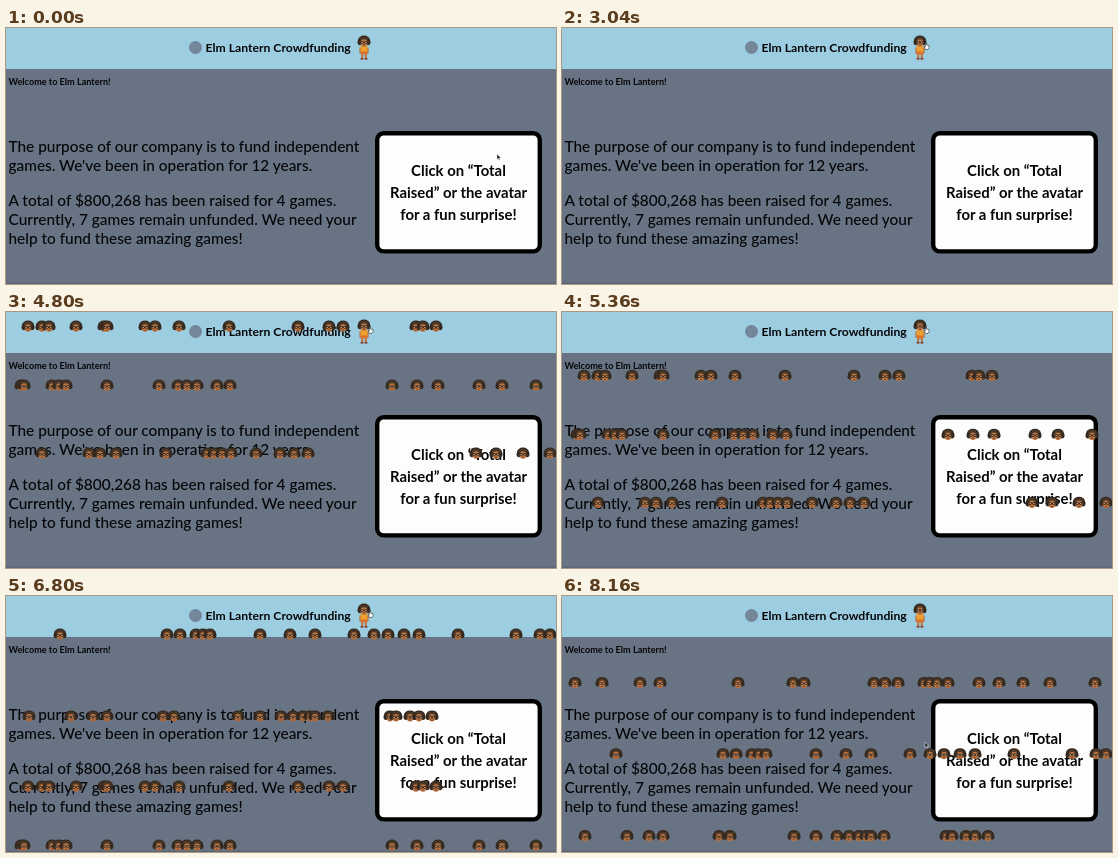
Write an HTML page with a canvas that moves like this. It is 550 px wide and 256 px high and loops after 8240 ms.

```html
<!DOCTYPE html>
<html lang="en">
<head>
<meta charset="utf-8">
<title>Elm Lantern Crowdfunding</title>
<style>
  html, body { margin: 0; width: 100%; height: 100%; overflow: hidden; background: #687484; }
  svg, canvas { position: absolute; left: 0; top: 0; width: 550px; height: 256px; display: block; }
  text { font-family: Lato, "Open Sans", sans-serif; fill: #050608; }
  .head { font-size: 12.2px; font-weight: 700; }
  .welcome { font-size: 9.1px; font-weight: 700; }
  .copy { font-size: 15.4px; font-weight: 500; }
  .note { font-size: 14.9px; font-weight: 700; text-anchor: middle; }
</style>
</head>
<body>
<svg viewBox="0 0 550 256">
  <rect width="550" height="256" fill="#687484"/>
  <rect width="550" height="41" fill="#9dcde1"/>
  <rect y="254.5" width="550" height="1.5" fill="#5c6776"/>
  <circle cx="189.5" cy="19.5" r="6.5" fill="#74869a"/>
  <text class="head" x="199.5" y="24">Elm Lantern Crowdfunding</text>
  <text class="welcome" x="2.5" y="57.3">Welcome to Elm Lantern!</text>
  <g class="copy">
    <text x="2.5" y="124.3">The purpose of our company is to fund independent</text>
    <text x="2.5" y="143.2">games. We've been in operation for 12 years.</text>
    <text x="2.5" y="178.2">A total of $800,268 has been raised for 4 games.</text>
    <text x="2.5" y="197">Currently, 7 games remain unfunded. We need your</text>
    <text x="2.5" y="216">help to fund these amazing games!</text>
  </g>
  <rect x="371.2" y="105.2" width="162.6" height="118.2" rx="6.5" fill="#fdfdfd" stroke="#000" stroke-width="4.4"/>
  <g class="note">
    <text x="452.5" y="148.3">Click on “Total</text>
    <text x="452.5" y="170">Raised” or the avatar</text>
    <text x="452.5" y="191.6">for a fun surprise!</text>
  </g>
</svg>
<canvas id="stage" width="550" height="256"></canvas>
<script>
const ctx = document.getElementById('stage').getContext('2d');
const LOOP = 8240, STEP = 80, SPEED = 0.088, START_Y = 8.5;

// Each click on the avatar drops one row of heads.
const rows = [
  { at: 3294, xs: [36, 83, 94, 110, 160, 201, 208, 216, 225, 250, 274, 288, 302, 470, 490, 517, 544] },
  { at: 4067, xs: [15, 18, 46, 53, 60, 101, 153, 172, 181, 191, 211, 224, 386, 411, 432, 473, 496, 530] },
  { at: 4737, xs: [22, 36, 43, 70, 98, 101, 139, 149, 173, 223, 292, 323, 337, 410, 417, 430] },
  { at: 5534, xs: [23, 65, 87, 101, 157, 168, 232, 254, 275, 287, 297, 304, 309, 322, 384, 390, 404, 413, 426] },
  { at: 6465, xs: [54, 161, 174, 190, 197, 204, 254, 284, 309, 348, 368, 382, 398, 413, 452, 510, 534, 544] },
  { at: 7275, xs: [13, 40, 78, 98, 176, 231, 242, 312, 323, 336, 362, 368, 375, 386, 417, 437, 461, 488, 533] }
];

// Pointer keys: time, x, y
const path = [[0, 491, 126], [500, 491, 126], [2000, 364, 15], [7900, 364, 15], [8160, 363, 146], [LOOP, 363, 146]];

function oval(x, y, rx, ry, color) {
  ctx.fillStyle = color;
  ctx.beginPath();
  ctx.ellipse(x, y, rx, ry, 0, 0, Math.PI * 2);
  ctx.fill();
}

function box(x, y, w, h, color) {
  ctx.fillStyle = color;
  ctx.fillRect(x, y, w, h);
}

function drawHead(x, y) {
  oval(x, y - 0.7, 6, 4.8, '#35291f');
  oval(x - 4, y + 1.2, 2.5, 3, '#35291f');
  oval(x + 4, y + 1.2, 2.5, 3, '#35291f');
  oval(x, y - 1.8, 4, 2.4, '#493728');
  oval(x, y + 1.9, 3.4, 3.7, '#b8733f');
  for (const side of [-1.8, 1.8]) {
    oval(x + side, y + 1.3, 1.6, 1.4, '#2b1d18');
    oval(x + side, y + 1.3, 0.8, 0.7, '#d9b696');
  }
  box(x - 1, y + 3.7, 2, 0.8, '#7c3b2a');
}

function drawAvatar(x, y) {
  box(x - 2.8, y + 12, 2, 6, '#b8733f');
  box(x + 0.8, y + 12, 2, 6, '#b8733f');
  box(x - 3.4, y + 17, 2.8, 1.6, '#7d3c2c');
  box(x + 0.6, y + 17, 2.8, 1.6, '#7d3c2c');
  box(x - 4.6, y + 6.5, 1.6, 6, '#b8733f');
  box(x + 3, y + 6.5, 1.6, 6, '#b8733f');
  box(x - 3.4, y + 5, 6.8, 6, '#eda031');
  box(x - 3.2, y + 10.5, 6.4, 3, '#d9742a');
  drawHead(x, y);
}

function shape(x, y, points, fill, line) {
  ctx.beginPath();
  for (const [dx, dy] of points) ctx.lineTo(x + dx, y + dy);
  ctx.closePath();
  ctx.fillStyle = fill;
  ctx.fill();
  ctx.strokeStyle = line;
  ctx.lineWidth = 0.6;
  ctx.stroke();
}

const arrow = [[0, 0], [0, 5.4], [1.3, 4.3], [2.2, 6.2], [3, 5.8], [2.2, 4], [3.8, 3.9]];
const hand = [[-0.6, 0], [0.5, 0], [0.6, 2], [3, 2.6], [3, 5], [2, 6.4], [-0.8, 6.4], [-2, 3.6], [-0.7, 4]];

function drawPointer(t) {
  const i = Math.max(1, path.findIndex(p => p[0] > t));
  const [t0, x0, y0] = path[i - 1], [t1, x1, y1] = path[i];
  const u = (t - t0) / (t1 - t0), k = u * u * (3 - 2 * u);
  const x = x0 + (x1 - x0) * k, y = y0 + (y1 - y0) * k;
  const over = Math.abs(x - 358) < 8 && y < 32;
  if (over) shape(x, y, hand, '#fff', '#222');
  else shape(x, y, arrow, '#0a0a0a', '#dfe3e8');
}

function draw(t) {
  ctx.clearRect(0, 0, 550, 256);
  drawAvatar(358, 13);
  for (const { at, xs } of rows) {
    const y = START_Y + (t - at) * SPEED;
    if (t >= at && y < 264) xs.forEach(x => drawHead(x, y));
  }
  drawPointer(t);
}

function tick() {
  const t = performance.now() % LOOP;
  draw(Math.floor(t / STEP) * STEP);
  requestAnimationFrame(tick);
}
tick();
</script>
</body>
</html>
```
